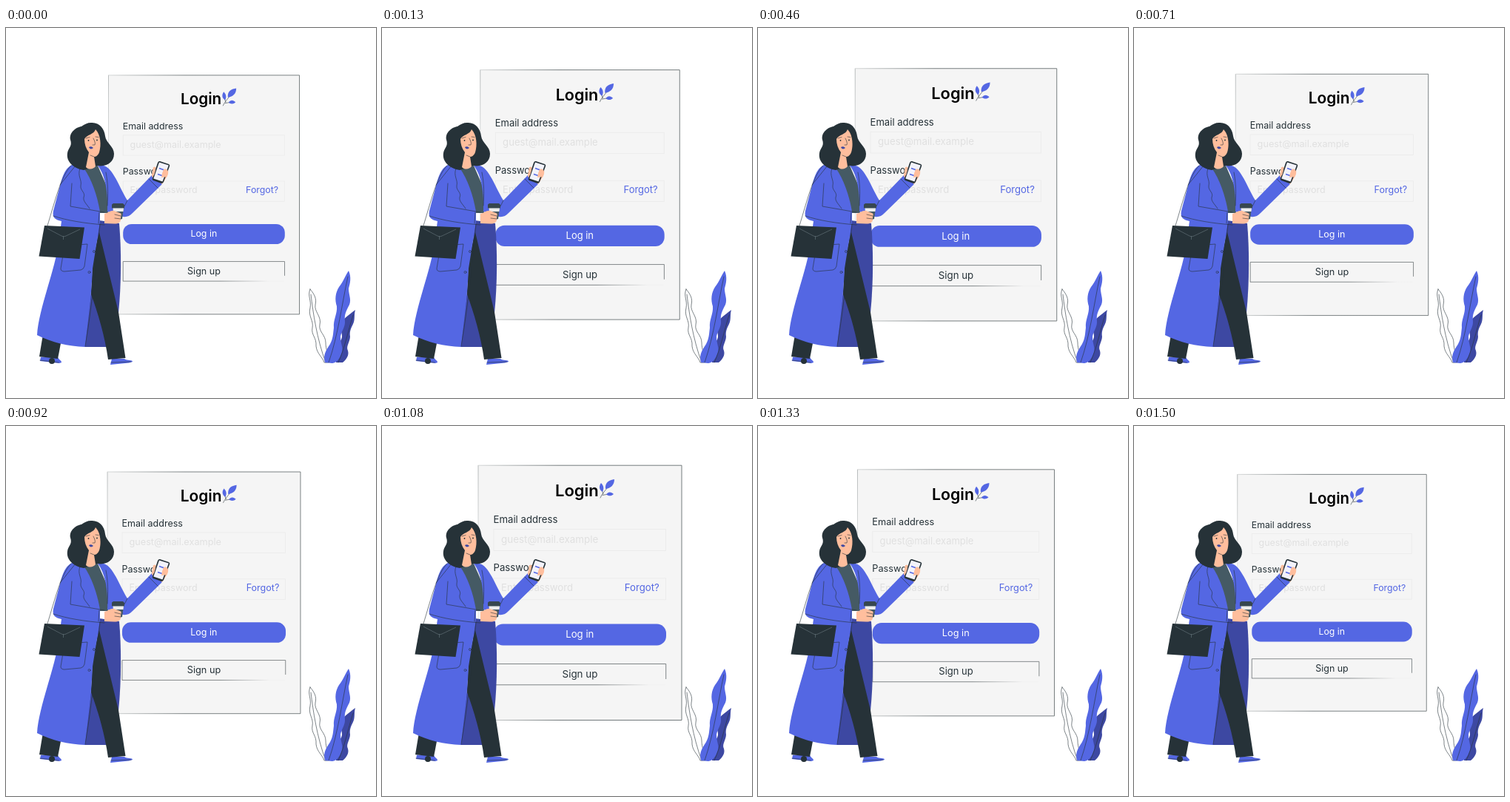
An HTML page that plays this animation: 500x500 px, repeating every 1.54 s.

```html
<!DOCTYPE html>
<html lang="en">
<head>
<meta charset="utf-8">
<title>Login</title>
<style>
  html, body { margin: 0; width: 100%; height: 100%; overflow: hidden; background: #fff; }
  svg { display: block; width: 100vw; height: 100vh; }
  text { font-family: Inter, "Open Sans", sans-serif; font-size: 13.2px; fill: #263238; }
  .hint { fill: #e0e0e0; }
  .blue { fill: #5467e3; }
  .navy { fill: #3d48a2; }
  .dark { fill: #263238; }
  .skin { fill: #ffbe9d; }
  .line { fill: none; stroke: #263238; stroke-width: .6; stroke-linecap: round; stroke-linejoin: round; }
</style>
</head>
<body>
<svg viewBox="0 0 500 500">
  <defs>
    <linearGradient id="fadeX" gradientUnits="userSpaceOnUse" x1="130" y1="0" x2="405" y2="0">
      <stop offset="0" stop-color="#d0d3d3"/><stop offset=".4" stop-color="#646c6e"/>
    </linearGradient>
    <linearGradient id="fadeY" gradientUnits="userSpaceOnUse" x1="0" y1="53" x2="0" y2="397">
      <stop offset="0" stop-color="#a4a9aa"/><stop offset=".35" stop-color="#dcdede"/>
    </linearGradient>
    <linearGradient id="fadeBox" gradientUnits="userSpaceOnUse" x1="151" y1="0" x2="384" y2="0">
      <stop offset=".6" stop-color="#555c5f"/><stop offset=".9" stop-color="#f0f0f0"/>
    </linearGradient>
  </defs>

  <g id="panel">
    <rect x="130" y="53" width="275" height="344.5" fill="#f5f5f5"/>
    <path d="M130 53V397.500" stroke="url(#fadeY)" stroke-width=".8"/>
    <path d="M130 53.200H405V397.500H130" fill="none" stroke="url(#fadeX)" stroke-width=".9"/>
    <text x="234" y="95.300" style="font-size:22px;font-weight:600;fill:#000">Login</text>

    <path class="line" d="M295 97C297 92 301 88 305 83M299 92L296 84M298 93.500L306 92"/>
    <path class="blue" d="M302 85C301 76 307 73 314 72C314 80 309 84 302 85Z"/>
    <path class="blue" d="M298 89C293 86 293 81 296 77C300 81 300 85 298 89Z"/>
    <path class="blue" d="M303 92.500C306 88 310 89 313 92C310 95 306 95 303 92.500Z"/>

    <text x="150.500" y="131">Email address</text>
    <rect x="151" y="139.500" width="232.500" height="29" fill="none" stroke="#ebebeb" stroke-width=".9"/>
    <text class="hint" x="161" y="157.700" style="font-size:13.4px">guest@mail.example</text>
    <text x="150.500" y="196.300">Password</text>
    <rect x="151" y="205.800" width="232.500" height="29" fill="none" stroke="#ebebeb" stroke-width=".9"/>
    <text class="hint" x="161" y="223.300">Enter password</text>
    <text x="351.300" y="223.300" text-anchor="middle" style="fill:#5467e3">Forgot?</text>

    <rect class="blue" x="151" y="267.500" width="233" height="29" rx="12.500"/>
    <text x="267.300" y="286.200" text-anchor="middle" style="fill:#fff">Log in</text>
    <path d="M151 350V321.500H383.700V342" fill="none" stroke="#596063" stroke-width=".75"/>
    <path d="M151 349.800H383" stroke="url(#fadeBox)" stroke-width=".75"/>
    <text x="267.500" y="340" text-anchor="middle" style="font-size:13.4px">Sign up</text>
  </g>

  <g id="plants">
    <path class="line" d="M411 353C417 360 420 366 418 374C416 383 427 390 424 401C422 410 432 415 432 425C432 435 436 440 435 452H430C428 445 420 440 419 430C420 418 412 415 414 405C416 395 408 390 411 378C413 368 407 362 411 353Z"/>
    <path class="line" d="M412 360C415 385 420 420 432 452"/>
    <path class="navy" d="M472 381C463 388 453 394 452 403C452 411 456 415 453 421C449 428 446 434 446 452H455C460 448 464 442 462 436C459 430 465 424 465 417C464 410 466 406 469 400C472 394 470 388 472 381Z"/>
    <path class="blue" d="M431 452C428 441 433 435 438 427C442 420 442 413 443 405C442 394 448 386 447 376C444 367 445 358 450 350C456 343 458 335 463 328C467 337 465 345 463 352C463 361 467 366 464 374C460 382 457 387 458 395C459 404 453 410 452 417C452 428 457 433 453 441C450 448 447 452 441 453Z"/>
    <path class="line" d="M462 336C454 372 449 415 436 452M469 388C462 410 458 432 449 452"/>
  </g>

  <g id="woman">
    <path class="blue" d="M47 444.500L70 445C72 449 75 449 75 452L72 453L46 450Z"/>
    <path class="blue" d="M143 447H160C164 450 171 448 171 451L166 452.500L141 455Z"/>
    <path class="line" d="M46 449L71 452M142 452L169 451"/>
    <circle class="dark" cx="62" cy="450" r="4"/>
    <path class="dark" d="M50 414L75 421L70 447L45 444Z"/>

    <path class="navy" d="M126 260L153 264C156 300 156 345 152 385L141 430L135 431L106 431Z"/>
    <path class="dark" d="M117 312L126 276L152 384L161.500 446L138 448C134 418 124 384 115 360Z"/>
    <path d="M104 189L124 186L138 218V250H124C120 226 114 205 104 189Z" fill="#455a64"/>

    <path class="blue" d="M124 186C142 181 149 207 164 233L197 199L211 211L171 250C165 257 157 256 151 252L137 248C138 225 135 200 124 186Z"/>
    <path class="line" d="M135 195C138 210 138 225 137 240M164 233L160 241M193 204L205 216"/>
    <path class="blue" d="M95 183C81 186 77 198 73 213L64 247C62 257 67 259 75 261L71 290C67 325 44 380 42 415C62 425 84 430 107 431C110 400 115 370 117 325L127 262V248C123 225 116 205 105 189Z"/>

    <path class="dark" d="M115 128C126 127 133 136 134 146C135 155 146 160 146 170C146 182 135 188 124 186L105 192C92 190 81 181 83 169C84 162 90 160 87 151C85 141 95 134 102 133C106 130 110 128 115 128Z"/>
    <path class="skin" d="M106 150C109 144 119 144 121 137C128 144 129 158 126 168C124 173 121 174 119 174L121 187C118 191 112 192 108 188L112 168C108 163 106 157 106 150Z"/>
    <path class="line" d="M118 149C120 153 121 156 120 158L117 158M108 149L113 147.500M121 147L125 147.500M114 172L119 174"/>
    <circle class="dark" cx="111.500" cy="152" r=".9"/>
    <circle class="dark" cx="123" cy="151.500" r=".9"/>
    <path class="navy" d="M112 161C114 159.500 116 160 118 162C116 164 113 164 112 161Z"/>

    <path class="line" d="M100 190C96 200 103 205 101 213C100 220 108 222 105 229C104 234 109 238 113 244M89 210L87 241L133 249M64 254C82 260 106 264 133 266M126 249L125 264"/>
    <path class="line" d="M127 265C122 310 120 350 107 430M79 295L74 325Q74 329 79 329L101 327Q105 326 106 322L110 292L97 293"/>
    <circle class="line" cx="119" cy="302" r="1.500"/>
    <circle class="line" cx="112.500" cy="330" r="1.500"/>
    <path class="line" d="M88 186C74 200 66 235 56 267M94 186L73 212"/>
    <path class="dark" d="M52 267L106 269.500L99.500 312L44.500 308.500Z"/>
    <path d="M56 271L75 281Q78 283 81 281L100 272M77.500 281V286" fill="none" stroke="#6b7980" stroke-width=".6"/>

    <path d="M145 243H159L157 258L147 260Z" fill="#455a64"/>
    <path d="M143 238.500L145 237H158L160 239V243.500H143Z" fill="#37474f"/>
    <path d="M144.500 243.500H159L158.500 248H145Z" fill="#ededed"/>
    <path class="skin" d="M133 251C138 250 142 246 146 247L154 250C157 251 155 254 155 257C156 262 152 265 146 264.500L133 264Z"/>
    <path class="line" d="M147 252L155 254M147 257L155 258"/>

    <path class="skin" d="M197 201L199 189Q201 186 203 189L206 194L216 189Q220 191 219 196L218 200L211 211L205 205Z"/>
    <path class="dark" d="M208 180L220 184Q222 185 221 187L213 208Q212 210 210 210L199 206Q197 205 198 203L205 182Q206 179.500 208 180Z"/>
    <path d="M207 181.500L219.800 185.500L211.500 207.500L199.300 203.500Z" fill="#f2f2fa"/>
    <path d="M207 189.500L214 192M205 197.500L211 199.500" stroke="#5467e3" stroke-width="1.600"/>
    <path class="skin" d="M213 191C217 189 220 193 219 197L217 201L210 202Q211 195 213 191ZM199 188Q202 188 202 192L200 199L197 200Z"/>
  </g>
</svg>

<script>
const LOOP = 1540;
const CX = 267.5, CY = 225.25, BASE = 275;
const panel = document.getElementById("panel");

// Panel width over the loop: [ms, px]
const keys = [
  [-40, 255.5], [0, 258], [130, 269.5], [300, 280], [460, 272.5], [710, 260.5],
  [800, 255], [1080, 275], [1160, 280], [1330, 266], [1500, 255.5], [1540, 258]
];

const slope = (a, b) => (b[1] - a[1]) / (b[0] - a[0]);

// Tangent at a key: flat at peaks and troughs, else the harmonic mean
function tangent(i) {
  const last = keys.length - 1;
  if (i === 0) return slope(keys[0], keys[1]);
  if (i === last) return slope(keys[last - 1], keys[last]);
  const a = slope(keys[i - 1], keys[i]), b = slope(keys[i], keys[i + 1]);
  return a * b <= 0 ? 0 : 2 * a * b / (a + b);
}

function widthAt(t) {
  let i = 0;
  while (i < keys.length - 2 && keys[i + 1][0] <= t) i++;
  const [t0, w0] = keys[i], [t1, w1] = keys[i + 1];
  const d = t1 - t0, u = (t - t0) / d, v = 1 - u;
  return v * v * (1 + 2 * u) * w0 + u * u * (1 + 2 * v) * w1
    + u * v * d * (v * tangent(i) - u * tangent(i + 1));
}

// 24 steps per second, each start rounded to 10 ms
const stepStart = n => Math.round(n * 100 / 24) * 10;

function stepTime(t) {
  let n = 36;
  while (n > 0 && stepStart(n) > t) n--;
  return stepStart(n);
}

function draw(ms) {
  const s = widthAt(stepTime(ms % LOOP)) / BASE;
  panel.setAttribute("transform", `translate(${CX} ${CY}) scale(${s}) translate(${-CX} ${-CY})`);
}

let start = null;
function tick(now) {
  if (start === null) start = now;
  draw(Math.max(0, now - start));
  requestAnimationFrame(tick);
}
draw(0);
requestAnimationFrame(tick);
</script>
</body>
</html>
```
